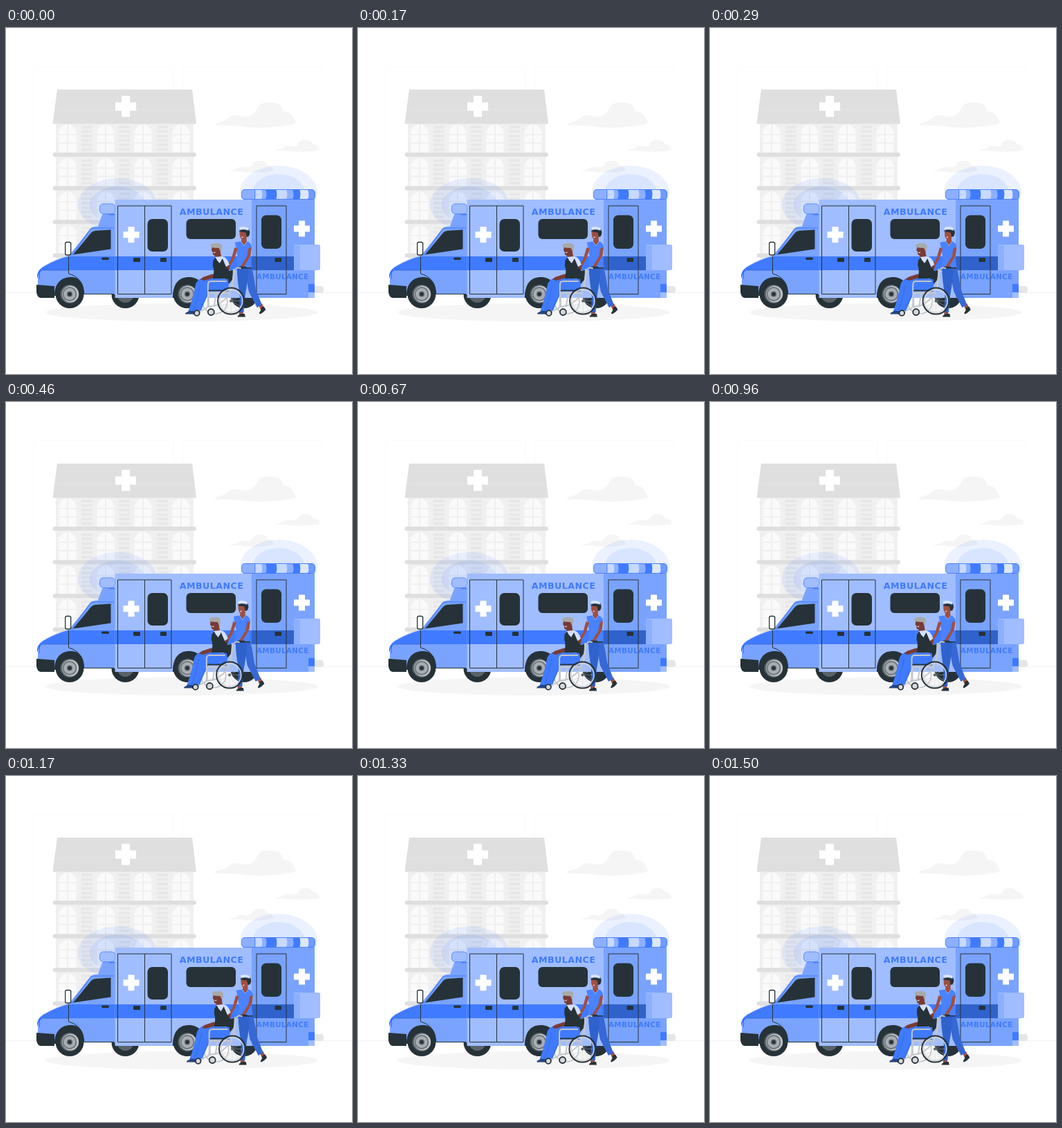
Animation, 500 px wide and 500 px high, one loop 1540 ms. Source, as an HTML page:

```html
<!DOCTYPE html>
<html lang="en">
<head>
<meta charset="utf-8">
<title>Ambulance</title>
<style>
html, body { margin: 0; width: 100%; height: 100%; overflow: hidden; background: #fff; }
svg { display: block; width: 100%; height: 100%; }
text { font-family: "DejaVu Sans", Inter, sans-serif; font-weight: 700; fill: #407bff; }
.dark { fill: #263238; }
.blue { fill: #407bff; }
.pale { fill: #a0bdff; }
.rear { fill: #79a3ff; }
.navy { fill: #3062cc; }
.skin { fill: #7a3b34; }
.tan { fill: #a04f40; }
.line { fill: none; stroke: #263238; stroke-width: 1; }
.tube { fill: none; stroke: #c4c7cb; stroke-width: 2; stroke-linecap: round; stroke-linejoin: round; }
.glow ellipse { fill: #407bff; opacity: .1; }
</style>
</head>
<body>
<svg viewBox="0 0 500 500">
  <defs>
    <g id="wheel">
      <circle r="20.500" class="dark"/>
      <circle r="13.500" fill="#59636a"/>
      <circle cx="1" r="12" fill="#c4c7ca"/>
      <circle r="10.500" fill="#6f777c"/>
      <circle r="8.500" fill="#a9aeb2"/>
      <circle r="4" fill="#59636a"/>
      <circle r="2.500" class="dark"/>
    </g>
    <path id="plus" d="M-4.500-11.500H4.500V-4.500H11.500V4.500H4.500V11.500H-4.500V4.500H-11.500V-4.500H-4.500Z" fill="#fff"/>
    <path id="cloud" d="M0 33C3 28 15 29 20 24C25 17 36 19 42 21C51 21 56 19 61 11C65 1 74-1 85 1C96 2 99 8 99 14C107 13 113 18 115 24Q118 28 118 31C92 37 70 38 44 36C28 33 12 35 0 33Z"/>
  </defs>

  <g fill="none" stroke="#fafafa">
    <path d="M39.500 382V59Q39.500 55.500 43 55.500H239Q242.500 55.500 242.500 59V382M255 382V59Q255 55.500 258 55.500H454Q457.500 55.500 457.500 59V382"/>
    <path d="M0 382.500H500" stroke="#f3f3f3"/>
  </g>

  <path d="M72 138H271V382H72Z" fill="#f0f0f0"/>
  <g id="floors"></g>
  <path d="M74 89H269L275 138.500H67.500Z" fill="#dfdfdf"/>
  <path d="M70.500 118.500H272.500" stroke="#e4e4e4"/>
  <path d="M167 98H179V107.500H188V119.500H179V128.500H167V119.500H158V107.500H167Z" fill="#fff"/>

  <g fill="#f5f5f5">
    <use href="#cloud" x="301" y="107"/>
    <use href="#cloud" transform="translate(390 161.500) scale(.535 .47)"/>
    <use href="#cloud" transform="translate(324 191.500) scale(.535 .47)"/>
  </g>

  <ellipse cx="254" cy="411" rx="197" ry="13" fill="#f5f5f5"/>
  <rect x="435" y="373" width="24" height="10" rx="4" fill="#e6e6e6"/>

  <g class="glow">
    <ellipse cx="161" cy="255" rx="57" ry="38"/>
    <ellipse cx="161" cy="256" rx="40" ry="27"/>
    <ellipse cx="394" cy="238" rx="56" ry="39"/>
    <ellipse cx="394" cy="238" rx="38" ry="27"/>
  </g>

  <g class="dark">
    <circle cx="172.500" cy="385" r="20"/>
    <circle cx="344" cy="385" r="20"/>
    <circle cx="172.500" cy="385" r="12" fill="#59636a"/>
  </g>

  <!-- cab -->
  <path d="M132 289L139 270Q140 268 143 268H158V290H132Z" class="rear"/>
  <rect x="135.500" y="254" width="22" height="14.500" rx="5" class="pale" stroke="#407bff" stroke-width=".8"/>
  <path d="M149 269.500H158" stroke="#407bff" stroke-width="1.500"/>
  <path d="M46 372V356Q47 348 57 343Q72 334 91 329L122 290Q124 287 129 287H160V385H72L46 374Z" class="rear"/>
  <path d="M45 362V357Q46 350 54 345Q72 335 91 330H160V350H54Q48 352 45 362Z" class="blue"/>
  <path d="M54 350H90.500" stroke="#3062cc" stroke-width=".8"/>
  <path d="M48.500 351V363" stroke="#3062cc" stroke-width=".8"/>
  <path d="M95 328.500L122 291Q124 289 128 289H156" fill="none" stroke="#407bff" stroke-width="1.200"/>
  <path d="M90.500 330V355Q107 359 111 375L113 384.500H156" class="line" stroke-width=".8"/>
  <path d="M97 327.500L123 296Q125 293.500 129 293L151.500 291.500V319.500Z" class="dark"/>
  <rect x="138" y="331.500" width="11" height="3.500" rx="1.700" class="dark"/>
  <rect x="85.700" y="309.500" width="8" height="18.500" rx="2" fill="#fff" stroke="#263238" stroke-width="1.300"/>
  <path d="M44 371L70 373V390H50Q45 389 44 382Z" class="dark"/>

  <!-- box -->
  <path d="M157.500 248H355.500V390H157.500Z" class="pale"/>
  <rect x="355" y="247" width="91" height="143" class="rear"/>
  <path d="M157.500 330H355V350H157.500Z" class="blue"/>
  <path d="M355 330H416V350H355Z" class="navy"/>
  <path d="M161.500 257H239V384.500H161.500ZM200.500 257V384.500M362 257H405V384.500H362Z" class="line"/>
  <g class="dark">
    <rect x="204.500" y="276" width="29.500" height="47" rx="7"/>
    <rect x="260.500" y="276" width="71.500" height="29" rx="6"/>
    <rect x="369" y="270.500" width="29" height="48.500" rx="7"/>
    <rect x="184" y="332" width="10" height="6" rx="1"/>
    <rect x="223" y="332" width="9" height="6" rx="1"/>
    <rect x="388.500" y="332" width="9.500" height="6" rx="1"/>
  </g>
  <use href="#plus" x="181" y="298.700"/>
  <use href="#plus" x="427.500" y="290"/>
  <text x="250.800" y="269.800" font-size="12.700" letter-spacing=".4">AMBULANCE</text>
  <text x="362" y="363" font-size="10.300" letter-spacing=".4">AMBULANCE</text>
  <path d="M437 370H446V382H437Z" class="blue"/>
  <path d="M437 382H446V390H437Z" class="pale"/>
  <rect x="416" y="313" width="38" height="37" rx="2" class="pale"/>
  <path d="M416 314H425V350H416Z" fill="#8cb0ff"/>
  <clipPath id="bar"><rect x="340.500" y="233.500" width="106" height="14.500" rx="4.500"/></clipPath>
  <g clip-path="url(#bar)" id="siren"><path d="M340 233H447V248H340Z" class="pale"/></g>
  <rect x="340.500" y="233.500" width="106" height="14" rx="4.500" fill="none" stroke="#407bff" stroke-width=".9"/>

  <!-- near wheels -->
  <path d="M70 387C70 370 79 360 94 360C107 360 113 370 113 384H105Z" class="dark"/>
  <path d="M241 390C241 369 250 360 264 360C279 360 288 370 288 390Z" class="dark"/>
  <use href="#wheel" x="92" y="384.500"/>
  <use href="#wheel" x="262" y="384.500"/>

  <g id="crew">
    <!-- nurse -->
    <path d="M365 400L370 398L373 404L368 407Z" class="tan"/>
    <path d="M337 408H343V414H337Z" class="tan"/>
    <path d="M346 346H355.500Q359 362 361 377L370 400L363 404L351 381Q347 362 346 346Z" fill="#3668d6"/>
    <path d="M334 346H350Q350 365 346 385L343.500 411H337.500L338 384Q334 364 334 346Z" class="navy"/>
    <path d="M335 416Q338 413 341 413H345L346 417.500H335Z" class="dark"/>
    <path d="M369 404L373 402.500L375.500 407Q371 412 367 413.500L366 412Q369 408 369 404Z" class="dark"/>
    <path d="M341 301L347.500 299L348 310L344 314L340 310Z" class="tan"/>
    <path d="M337.500 292Q343 289 350 292Q352 297 348 302L344 305.500Q339 306 338 300Z" class="tan"/>
    <path d="M337.500 293Q343 289 351 291Q354 295 351 301L348 302L346.500 295.500Q342 295 337.500 294Z" class="dark"/>
    <path d="M337 288Q344 285 351 289L350.500 292.500Q343 290 337.500 292Z" fill="#dce7ff" stroke="#8cb0ff" stroke-width=".5"/>
    <path d="M339.500 302Q341 303 343 301L342 303.500Z" fill="#fff"/>
    <path d="M331 310Q337 308 340 309L344 314L348 308.500Q353 309 355 315L353 330L355 347H333L335 331L333 319Z" fill="#4a82ff"/>
    <path d="M340 309L344 315L348 309" fill="none" stroke="#a0bdff" stroke-width=".7"/>
    <path d="M334 346H355V347.500H334Z" class="dark"/>
    <path d="M330.500 317L335 319L330 334L322 347L317 351L319 344L326 333Z" class="tan"/>
    <path d="M350.500 318L355 317L353.500 329L344 345L338 348.500L339 345L348.500 330Z" class="tan"/>

    <!-- chair back -->
    <path d="M320 351L328.500 350L327 364L319 374H314Z" class="dark"/>
    <path d="M329 349V360L323 386M293 367V403" class="tube"/>
    <circle cx="302" cy="395" r="18" fill="none" stroke="#b5b9bd" stroke-width="1.200"/>

    <!-- patient -->
    <path d="M280 363Q286 359 300 361L321 363Q324 377 317 380H294L281 411H263Q270 391 273 376Q274 366 280 363Z" class="blue"/>
    <path d="M294 379L284 399L280 411M281 371Q278 389 270 410" fill="none" stroke="#3062cc" stroke-width=".6"/>
    <path d="M264 408.500L277 409.500L276 415L270 413.500H259Q260 410 264 410Z" fill="#26437f"/>
    <path d="M302 326L310 324L312 334L302 336Z" class="skin"/>
    <path d="M298 316Q305 311 311 316L310 326Q305 331 299.500 328L298.500 323L297 321.500Z" class="skin"/>
    <path d="M295.500 314Q297 311 303 311Q310 310 312 314Q313 319 310 323L308 318Q302 318 297 317Z" fill="#a9aaa8"/>
    <path d="M299 324.500L303 323.500L302 325.500Z" fill="#dedede"/>
    <path d="M317 344L323.500 342Q324 350 319 355Z" class="skin"/>
    <path d="M303 355L300 361L287 365L281 363.500L285 360L297 356Z" class="skin"/>
    <path d="M302 331L312 330Q319 330 323 342L317 346H306Z" fill="#d3e0ff"/>
    <path d="M299.500 336L303 331.500Q305 337 309 340L313 333L318.500 346L322 350V362H299Q302 352 299 343Z" class="dark"/>

    <!-- chair -->
    <path d="M292 378.500H321V380.500H292Z" class="dark"/>
    <path d="M338 346H346" stroke="#263238" stroke-width="2.500" stroke-linecap="round"/>
    <path d="M339 347Q331 345 330 353L327 378M318 366H296Q292 366 292 371V401Q291 406 285 407L278 411M292 383H324M294 403L307 400L320 389M304 383L301 402" class="tube"/>
    <circle cx="325.300" cy="394.500" r="19" fill="none" stroke="#263238" stroke-width="2"/>
    <circle cx="325.300" cy="394.500" r="16.500" fill="none" stroke="#d0d4d8" stroke-width="1.500"/>
    <g id="spokes" stroke="#c4c7cb" stroke-width=".4"></g>
    <circle cx="325.300" cy="394.500" r="2" fill="#59636a"/>
    <circle cx="296.500" cy="410.500" r="4.500" fill="#d6d9dc" stroke="#263238" stroke-width="1.800"/>
    <circle cx="276" cy="412" r="3.800" fill="#d6d9dc" stroke="#263238" stroke-width="1.800"/>
  </g>
</svg>
<script>
const $ = id => document.getElementById(id);
const add = (id, markup) => $(id).insertAdjacentHTML('beforeend', markup);
const range = n => [...Array(n).keys()];

// hospital floors: arched windows, louvres and a ledge
const arch = (x, y) => `<path d="M${x - 12.5} ${y + 41}V${y + 13}a12.5 12.5 0 0 1 25 0V${y + 41}Z" fill="#fafafa"/>
  <path d="M${x} ${y + 1}V${y + 41}M${x - 12.5} ${y + 15}h25M${x - 12.5} ${y + 27}h25" stroke="#f0f0f0" stroke-width="2" fill="none"/>`;
const louvre = (x, y) => range(6).map(i =>
  `<path d="M${x - 8} ${y + 4 + i * 6.5}h16" stroke="#e8e8e8" stroke-width="4"/>`).join('');
range(5).forEach(i => {
  const y = 139 + i * 48.6;
  add('floors', [89, 144, 198, 253].map(x => arch(x, y)).join('') +
    [117, 171, 226].map(x => louvre(x, y)).join('') +
    (i < 4 ? `<rect x="67.500" y="${y + 41}" width="207.500" height="6" rx="3" fill="#dfdfdf"/>` : ''));
});

// light bar segments: x, width, colour
[[340, 18, '#8cb0ff'], [360, 9, '#c7d9ff'], [369, 6, '#8cb0ff'],
 [375, 15, '#407bff'], [390, 15, '#c7d9ff'], [405, 9, '#8cb0ff'], [414, 10, '#407bff'],
 [424, 12, '#dce7ff'], [436, 11, '#6f9bff']].forEach(([x, w, c]) =>
  add('siren', `<path d="M${x} 233h${w}q3 7 0 15h${-w}q3-7 0-15" fill="${c}"/>`));
add('siren', '<path d="M359.500 233V248M390 233V248M424 233V248" stroke="#407bff" stroke-width=".8"/>');

range(12).forEach(i =>
  add('spokes', `<path d="M325.300 394.500h16" transform="rotate(${i * 30} 325.300 394.500)"/>`));

// sideways shake, linear between equal steps
const LOOP = 1540, STEP = 150, FPS = .024, LEAD = 26;
const shake = [0, -1, 2, -4, 4, -4, 4, -4, 2, -1, 0];

function offset(ms) {
  const p = (ms % 1500) / STEP, i = Math.floor(p);
  return shake[i] + (shake[i + 1] - shake[i]) * (p - i);
}

function draw(now) {
  const tick = Math.min(36, Math.floor((now % LOOP + 4) * FPS));
  $('crew').setAttribute('transform', `translate(${offset(tick / FPS + LEAD).toFixed(2)} 0)`);
  requestAnimationFrame(draw);
}
draw(performance.now());
</script>
</body>
</html>
```
